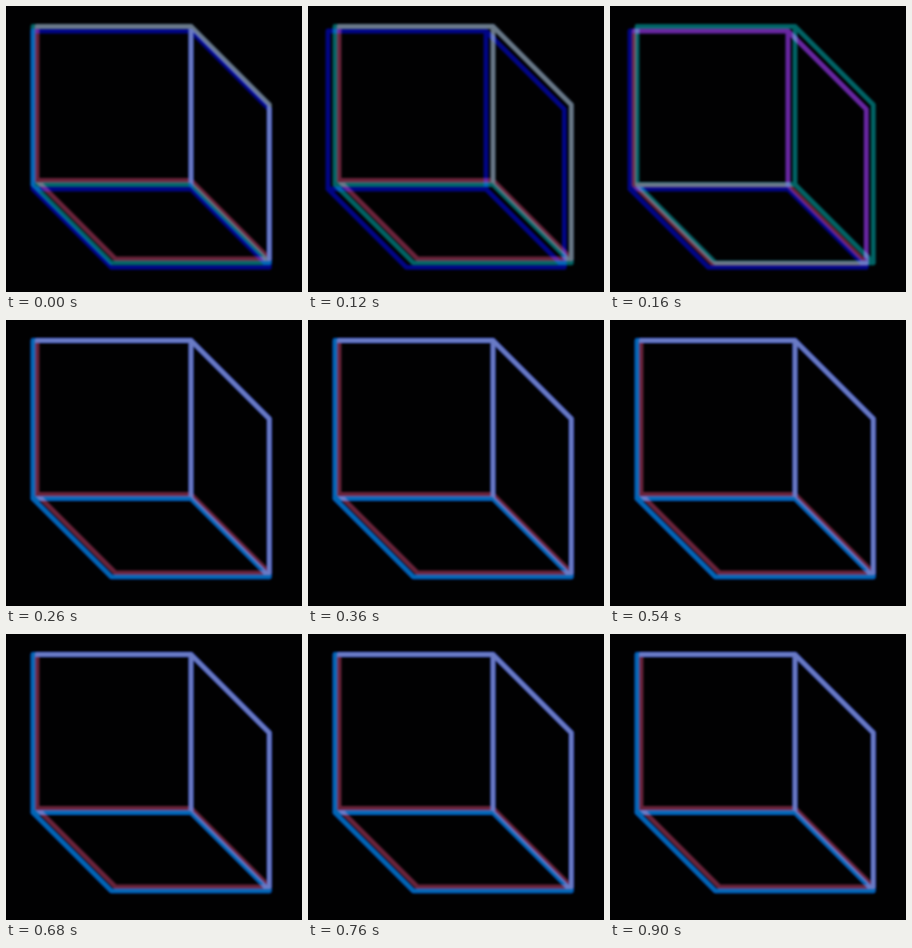
Write an HTML page that moves like this. It is 296 px wide and 286 px high and loops after 1 s.

```html
<!DOCTYPE html>
<html lang="en">
<head>
<meta charset="utf-8">
<title>Glitch cube</title>
<style>
  html, body { margin: 0; width: 100%; height: 100%; overflow: hidden; background: #000; }
  svg { display: block; width: 100vw; height: 100vh; isolation: isolate; }
  path { fill: none; stroke-width: 4.8; stroke-linejoin: round; stroke-linecap: round;
         mix-blend-mode: screen; filter: blur(1.2px); }
</style>
</head>
<body>
<svg viewBox="0 0 296 286">
  <rect width="296" height="286" fill="#010102"/>
  <path id="teal" stroke="rgb(0,98,100)"/>
  <path id="red" stroke="rgb(104,34,56)"/>
  <path id="blue" stroke="rgb(0,4,132)"/>
</svg>
<script>
const LOOP = 1000, DEPTH = 78.3;

// Front square, then the right and bottom faces receding down and to the right.
function cube(left, top, size) {
  const right = left + size, bottom = top + size, d = DEPTH;
  return `M${left} ${top}H${right}V${bottom}H${left}Z` +
    `M${right} ${top}l${d} ${d}v${size}h${-size}L${left} ${bottom}` +
    `M${right} ${bottom}l${d} ${d}`;
}

const layer = id => document.getElementById(id);
const red = layer("red"), blue = layer("blue"), teal = layer("teal");
teal.setAttribute("d", cube(27, 20.5, 158));
red.setAttribute("d", cube(31, 20.5, 154));
blue.setAttribute("d", cube(27, 20.5, 158));

// Each pose holds until the next start time.
const poses = [
  { at: 0, red: [0, 0], blue: [0, 4.5] },
  { at: 20, red: [0, 0], blue: [-7, 4.5] },
  { at: 140, red: [-7, 4.5], blue: [-7, 4.5] },
  { at: 260, red: [0, 0], blue: [0, 0] }
];

function draw(ms) {
  const pose = poses.filter(p => p.at <= ms).pop();
  red.setAttribute("transform", `translate(${pose.red})`);
  blue.setAttribute("transform", `translate(${pose.blue})`);
}

let start;
function tick(now) {
  if (start === undefined) start = now;
  draw(Math.max(0, now - start) % LOOP);
  requestAnimationFrame(tick);
}
draw(0);
requestAnimationFrame(tick);
</script>
</body>
</html>
```
